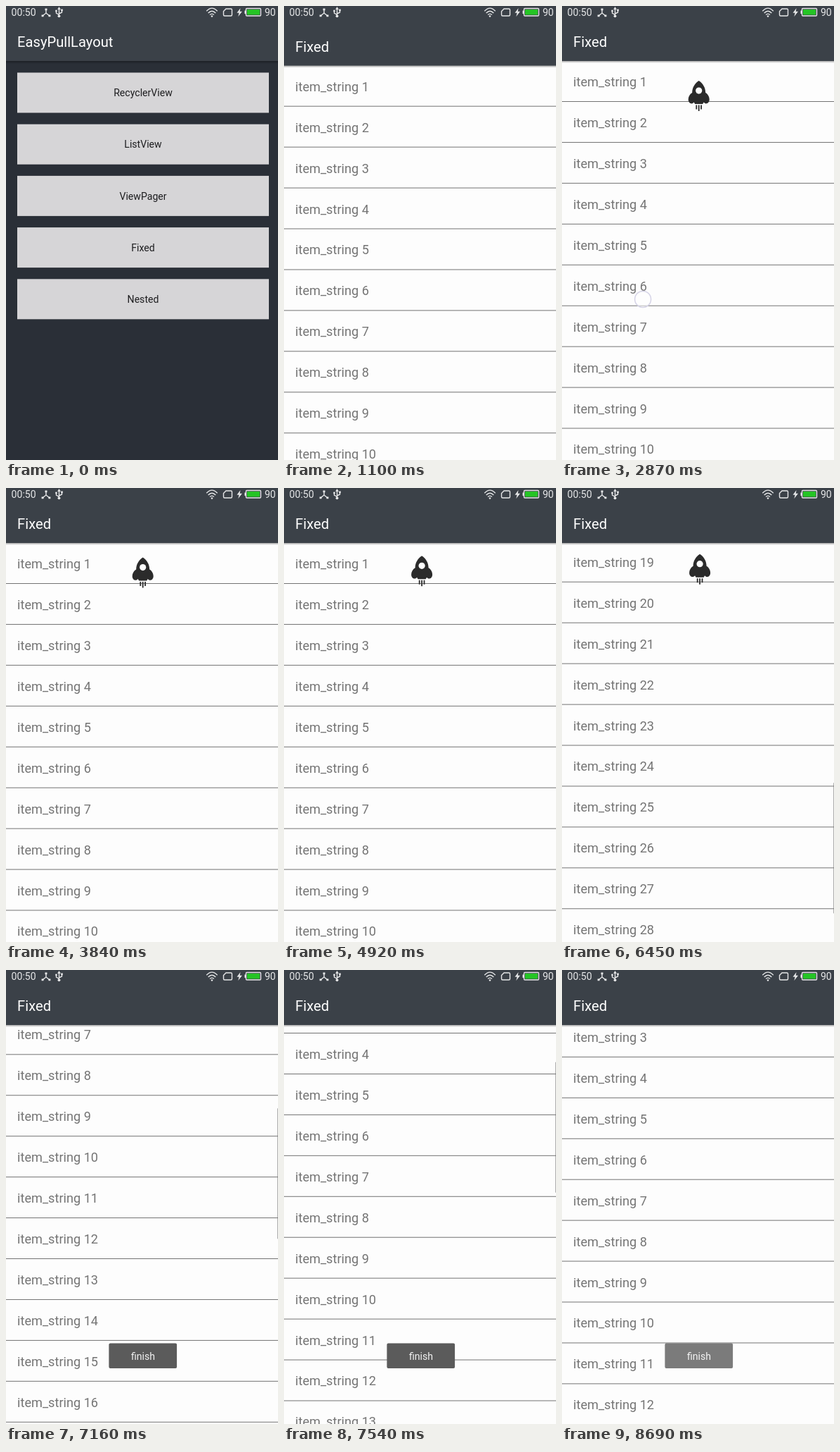
An HTML page that plays this animation: 387 by 644 pixels, repeating every 8.79 s.

```html
<!DOCTYPE html>
<html lang="en">
<head>
<meta charset="utf-8">
<title>EasyPullLayout</title>
<style>
  html, body { margin: 0; width: 100%; height: 100%; overflow: hidden; background: #2a2f37; }
  svg { display: block; width: 387px; height: 644px; font-family: Roboto, "Open Sans", sans-serif; }
  .title { font-size: 20.16px; fill: #fff; }
  .row { font-size: 18.14px; fill: #757575; }
  .label { font-size: 14.1px; text-anchor: middle; fill: #1e1e20; }
  .status { font-size: 14.1px; fill: #e6e7e8; }
  .line { fill: none; stroke: #e6e7e8; stroke-width: 1.4; }
  .solid { fill: #e6e7e8; }
</style>
</head>
<body>
<svg viewBox="0 0 387 644">
  <defs>
    <linearGradient id="shade" x2="0" y2="1">
      <stop offset="0" stop-color="#000" stop-opacity=".34"/>
      <stop offset="1" stop-color="#000" stop-opacity="0"/>
    </linearGradient>
  </defs>

  <g id="menu">
    <rect width="387" height="644" fill="#2a2f37"/>
    <g id="buttons"></g>
    <rect width="387" height="78" fill="#3b4148"/>
    <rect y="78" width="387" height="4" fill="url(#shade)"/>
    <text class="title" x="16.1" y="58">EasyPullLayout</text>
  </g>

  <g id="page">
    <rect width="387" height="700" fill="#fdfdfd"/>
    <g id="rows"></g>
    <g id="rocket" fill="#2b2b2b">
      <path d="M0 0C6 4 9.500 10 9.500 17C13 19 15 23 15 26.500C15 30 13 32.300 10 32.300C9 32.300 8 31.500 7 30.500L5.500 33H-5.500L-7 30.500C-8 31.500-9 32.300-10 32.300C-13 32.300-15 30-15 26.500C-15 23-13 19-9.500 17C-9.500 10-6 4 0 0Z"/>
      <circle cy="14" r="4.6" fill="#fdfdfd"/>
      <path d="M-4.300 34.500h1.800v6h-1.800zM-.9 34.500h1.800v8.500h-1.800zM2.500 34.500h1.800v6h-1.800z"/>
    </g>
    <rect id="bar" x="386.4" width=".6" height="185" fill="#777"/>
    <rect width="387" height="78" fill="#3b4148"/>
    <rect y="78" width="387" height="3" fill="url(#shade)"/>
    <text class="title" x="16.1" y="58">Fixed</text>
  </g>

  <rect width="387" height="20" fill="#3b4148"/>
  <text class="status" x="7.6" y="14">00:50</text>
  <g transform="translate(57 10)">
    <path class="line" d="M0-6V0L-5 4M0 0L5 4"/>
    <path class="solid" d="M-1.500-6.500h3v2.800h-3zM-6.400 2.500h3v2.800h-3zM3.400 2.500h3v2.800h-3z"/>
  </g>
  <g transform="translate(75.5 9)">
    <path class="line" d="M0-5V5M0 3.500L-4 1V-2M0 2L4 0V-3"/>
    <path class="solid" d="M0-8L2.300-4H-2.300Z"/>
    <circle class="solid" cy="5.3" r="1.9"/>
    <circle class="solid" cx="-4" cy="-2" r="1.4"/>
    <path class="solid" d="M2.700-4.500h2.600v2.600h-2.600z"/>
  </g>
  <g transform="translate(293 14)">
    <path class="line" d="M-7.700-6.700Q0-15 7.700-6.700M-5.300-4Q0-9.600 5.300-4M-2.900-1.400Q0-4.400 2.900-1.400"/>
    <circle class="solid" cy=".5" r="1.3"/>
  </g>
  <path class="line" d="M313 4H320Q321.500 4 321.500 5.500V12.500Q321.500 14 320 14H311Q309.500 14 309.500 12.500V7.500Z"/>
  <path class="solid" d="M333.500 3L328.500 9.800H331.600L330.300 15L336 7.700H332.700Z"/>
  <g transform="translate(339.500 3)">
    <rect class="line" x="2" y=".5" width="21" height="10.500" rx="1.200"/>
    <rect class="solid" y="3.500" width="1.700" height="4.500"/>
    <rect x="3.500" y="2" width="18" height="7.500" fill="#25c425"/>
  </g>
  <text class="status" x="367.900" y="14">90</text>

  <g id="toast">
    <rect x="146.400" y="529.600" width="96.700" height="35.300" rx="2" fill="#5b5b5b"/>
    <text class="label" x="195" y="553" style="fill:#f2f2f2">finish</text>
  </g>
  <circle id="touch" r="11.500" fill="#fff" fill-opacity=".5" stroke="#d5d3e6" stroke-width="1.500"/>
</svg>

<script>
const LOOP = 8790, STEP = 1000 / 17, PHASE = 30;
const PITCH = 57.94, COUNT = 30, VIEW = 566;
const END = COUNT * PITCH - VIEW;

const $ = id => document.getElementById(id);
const ramp = (t, from, to) => Math.max(0, Math.min(1, (t - from) / (to - from)));
const easeOut = p => 1 - (1 - p) ** 2;
const mix = (a, b, p) => a + (b - a) * p;
const move = (el, x, y) => el.setAttribute("transform", `translate(${x} ${y})`);

const touches = [
  { start: 740, end: 840, from: [200, 343], to: [200, 343] },
  { start: 2280, end: 3550, from: [130, 341], to: [97, 507] },
  { start: 5500, end: 5644, from: [112, 470], to: [118, 385] },
  { start: 6650, end: 6760, from: [80, 300], to: [82, 405] },
  { start: 7640, end: 7800, from: [60, 400], to: [60, 400] }
];

$("buttons").innerHTML = ["RecyclerView", "ListView", "ViewPager", "Fixed", "Nested"].map((name, i) => {
  const y = 94.5 + i * 73.2;
  return `<rect x="16" y="${y}" width="358" height="57" fill="#d6d5d7"/>
    <text class="label" x="195" y="${y + 33.7}">${name}</text>`;
}).join("");
const pressed = $("buttons").querySelectorAll("rect")[3];

$("rows").innerHTML = Array.from({ length: COUNT }, (_, i) => {
  const y = 78 + i * PITCH;
  return `<text class="row" x="16.1" y="${y + 36}">item_string ${i + 1}</text>
    <rect y="${y + 57}" width="387" height="1" fill="#737373"/>`;
}).join("");

// A fling decays exponentially from one offset towards another.
const fling = (t, start, tau, from, to) => mix(to, from, Math.exp(-Math.max(0, t - start) / tau));

function scrollAt(t) {
  const turn = 6760;
  const up = fling(Math.min(t, turn), 5644, 359, 0, END);
  // The way back is caught by a finger before it runs out.
  return t < turn ? up : Math.max(128, fling(t, turn, 304, up, 70));
}

function rocketAt(t) {
  const y = 18 + 126 * easeOut(ramp(t, 2280, 3550))
    - 49 * easeOut(ramp(t, 3590, 3870))
    - 77 * ramp(t, 6580, 6860);
  const wave = period => Math.cos(2 * Math.PI * (t - 4912) / period);
  const refreshing = t > 3870 && t < 6580;
  return refreshing ? [194.9 + 1.2 * wave(153), y + 1.3 * wave(180)] : [194.7, y];
}

function draw(t) {
  // Opening the page: fade in while sliding up.
  const open = ramp(t, 890, 1200);
  $("page").setAttribute("opacity", Math.min(1, open * 1.6));
  move($("page"), 0, 52 * (1 - easeOut(open)));
  pressed.setAttribute("fill", t >= 740 && t < 1220 ? "#c4c3c6" : "#d6d5d7");

  const scroll = scrollAt(t);
  move($("rows"), 0, -scroll);
  $("bar").setAttribute("y", 78 + scroll * VIEW / (COUNT * PITCH));
  $("bar").setAttribute("opacity", t < 5640 ? 0 : 1 - ramp(t, 7800, 8100));

  move($("rocket"), ...rocketAt(t));
  $("toast").setAttribute("opacity", ramp(t, 6600, 6800) * (1 - 0.2 * ramp(t, 8530, 8670)));

  const touch = touches.find(k => t >= k.start && t < k.end);
  $("touch").setAttribute("visibility", touch ? "visible" : "hidden");
  if (touch) {
    const p = ramp(t, touch.start, touch.end);
    move($("touch"), ...touch.from.map((v, i) => mix(v, touch.to[i], p)));
  }
}

const hold = t => Math.max(0, Math.floor((t - PHASE) / STEP) * STEP + PHASE);

const start = performance.now();
function frame() {
  draw(hold((performance.now() - start) % LOOP));
  requestAnimationFrame(frame);
}
frame();
</script>
</body>
</html>
```
